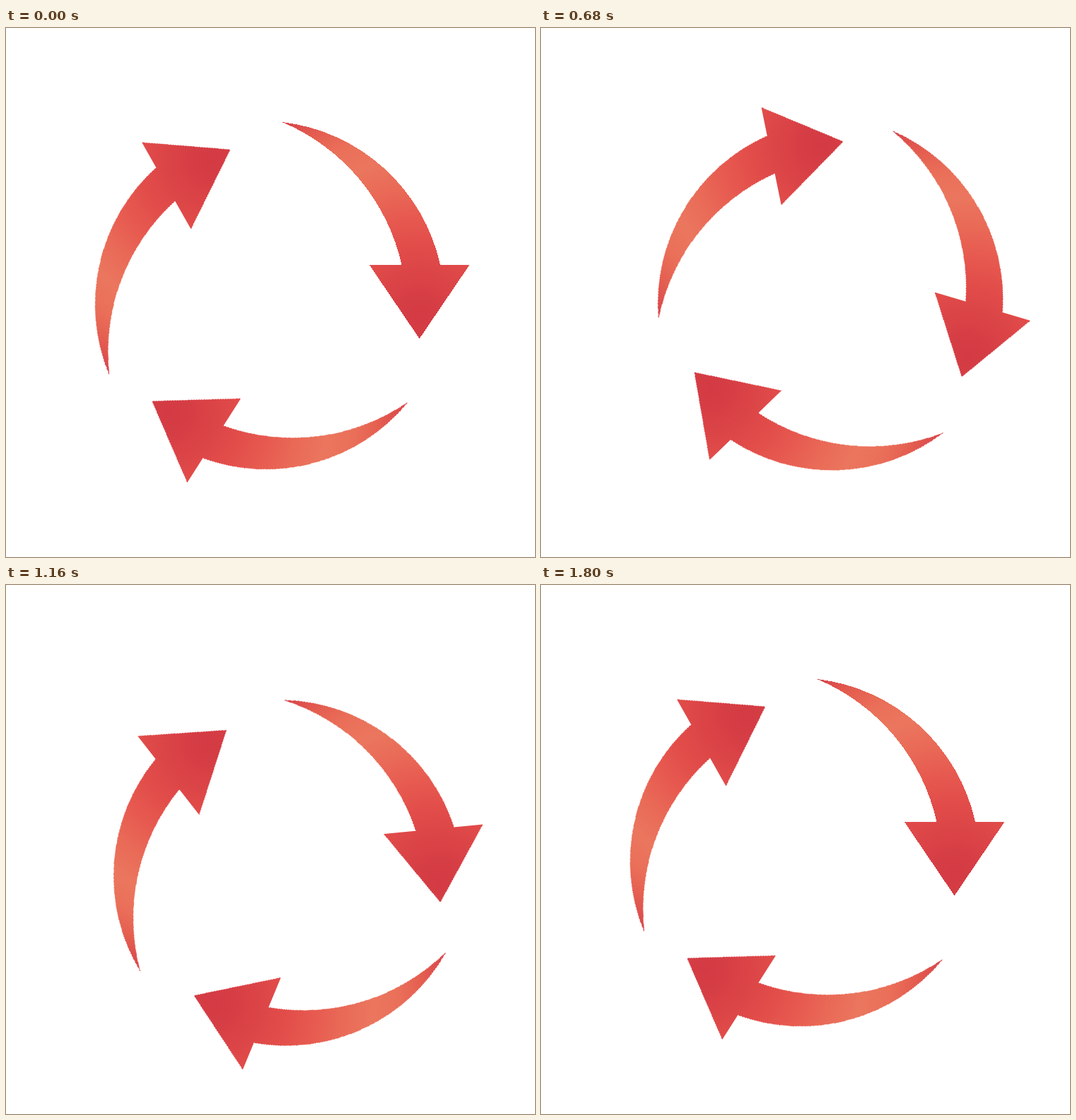
Write an HTML page without scripts that moves like this. It is 748x748 px and loops after 1920 ms.

```html
<!DOCTYPE html>
<html lang="en">
<head>
<meta charset="utf-8">
<title>Cycle arrows</title>
<style>
  html, body { margin: 0; width: 100%; height: 100%; overflow: hidden; background: #fff; }
  svg { display: block; width: 100vw; height: 100vh; }
  .ring {
    transform-origin: 391.1px 388.7px;
    animation: turn 1920ms infinite;
  }
  /* 8 degrees every 40 ms, then a short rest */
  @keyframes turn {
    0% { transform: rotate(0deg); animation-timing-function: steps(45, end); }
    93.75%, 100% { transform: rotate(360deg); }
  }
</style>
</head>
<body>
<svg viewBox="0 0 748 748" shape-rendering="crispEdges">
  <defs>
    <radialGradient id="heat" gradientUnits="userSpaceOnUse" cx="0" cy="-29" r="338">
      <stop offset="0" stop-color="#d33a43"/>
      <stop offset=".1" stop-color="#d63e45"/>
      <stop offset=".2" stop-color="#dc4547"/>
      <stop offset=".31" stop-color="#e24d4a"/>
      <stop offset=".43" stop-color="#e75a50"/>
      <stop offset=".55" stop-color="#e96a57"/>
      <stop offset=".67" stop-color="#eb765e"/>
      <stop offset=".78" stop-color="#ea6f59"/>
      <stop offset=".88" stop-color="#e45e50"/>
      <stop offset="1" stop-color="#d8434a"/>
    </radialGradient>
    <!-- tip at 0,0, pointing down -->
    <path id="arrow" fill="url(#heat)"
      d="M0 0L-70.7 -104.2H-25A288 288 0 0 0 -194.2 -306.3A260 260 0 0 1 29.5 -104.2H70.7Z"/>
  </defs>
  <g class="ring">
    <use href="#arrow" transform="translate(317.3 171.8) rotate(-119.5)"/>
    <use href="#arrow" transform="translate(584.6 439.3)"/>
    <use href="#arrow" transform="translate(206.4 527.5) rotate(122.5)"/>
  </g>
</svg>
</body>
</html>
```
